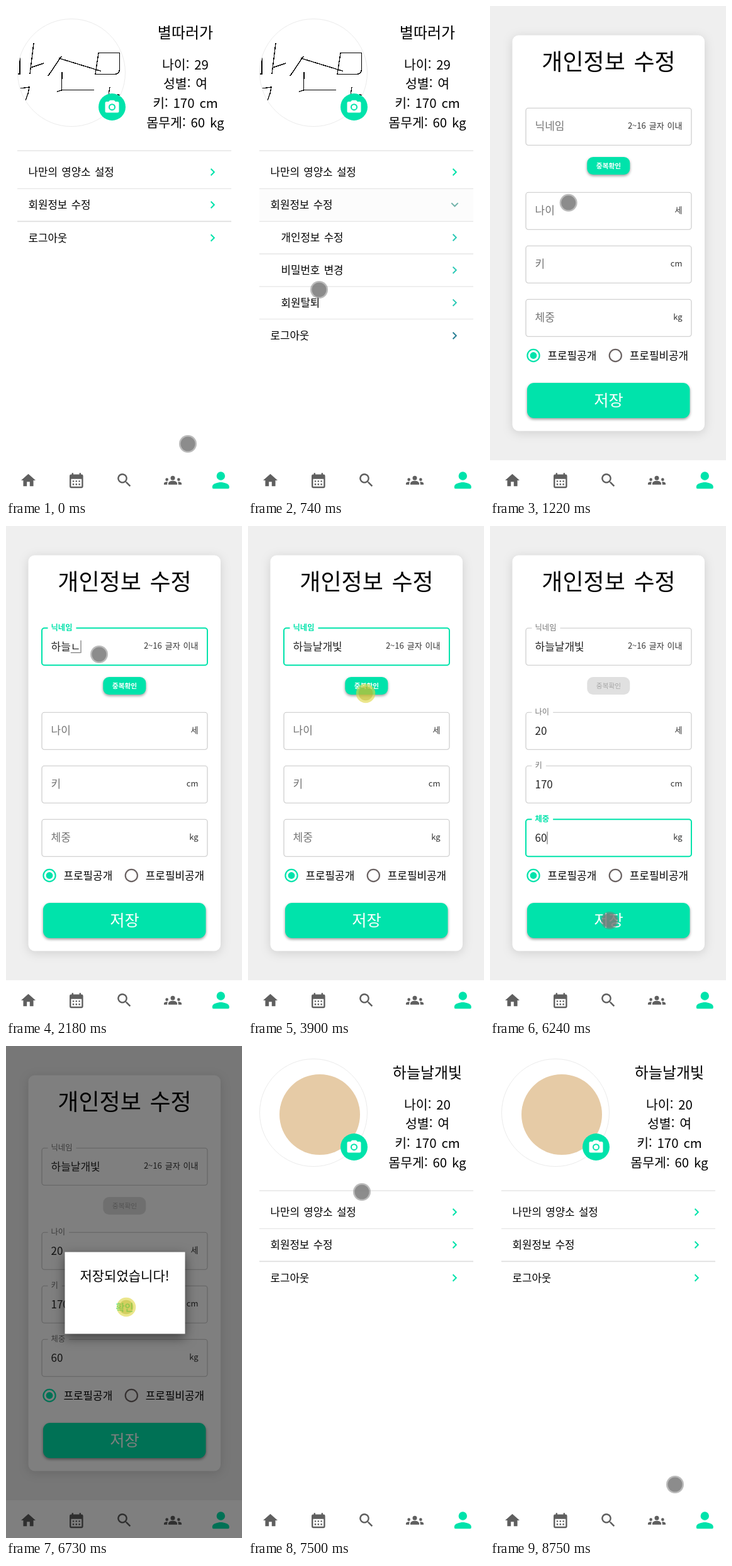
These frames come from a looping animation (375 by 782 pixels, 8820 ms). An HTML page:

```html
<!DOCTYPE html>
<html lang="ko">
<head>
<meta charset="utf-8">
<title>개인정보 수정</title>
<style>
  html, body { margin: 0; width: 100%; height: 100%; overflow: hidden; background: #fff; }
  svg { display: block; width: 375px; height: 782px; }
  text { font-family: "Noto Sans CJK KR", "Noto Sans CJK", "Noto Sans", sans-serif; word-spacing: .1em; white-space: pre; }
  .card { filter: drop-shadow(0 3px 8px rgba(0,0,0,.13)); }
  .raised { filter: drop-shadow(0 2px 2px rgba(0,0,0,.4)); }
  .dialog { filter: drop-shadow(0 6px 9px rgba(0,0,0,.5)); }
</style>
</head>
<body>
<svg id="stage" viewBox="0 0 375 782"></svg>
<script>
const LOOP = 8820, GREEN = '#00e3ab', GRAY = '#5f5f5f';
const $ = id => document.getElementById(id);

// y is the middle of the line of text
const text = (s, x, y, size, o = {}) =>
  `<text x="${x}" y="${y + size * .37}" font-size="${size}" fill="${o.fill || '#000'}"
    text-anchor="${o.anchor || 'start'}" font-weight="${o.weight || 400}">${s}</text>`;
const mid = (s, x, y, size, o = {}) => text(s, x, y, size, { ...o, anchor: 'middle' });
const rect = (x, y, w, h, fill, more = '') =>
  `<rect x="${x}" y="${y}" width="${w}" height="${h}" fill="${fill}" ${more}/>`;
const circle = (x, y, r, fill, more = '') => `<circle cx="${x}" cy="${y}" r="${r}" fill="${fill}" ${more}/>`;
const line = (y, color = '#e6e6e6', w = 1.3) => `<path d="M18 ${y}H358" stroke="${color}" stroke-width="${w}"/>`;
const icon = (d, x, y, s, fill = GRAY) =>
  `<path transform="translate(${x} ${y}) scale(${s}) translate(-12 -12)" d="${d}" fill="${fill}" fill-rule="evenodd"/>`;
const chevron = (y, color = GREEN, turn = 0) =>
  `<path transform="translate(328.5 ${y}) rotate(${turn})" d="M-2.9 -5.2L2.3 0L-2.9 5.2" fill="none" stroke="${color}" stroke-width="2"/>`;

const ICONS = {
  home: 'M10 20v-6h4v6h5v-8h3L12 3 2 12h3v8z',
  calendar: 'M19 4h-1V2h-2v2H8V2H6v2H5a2 2 0 0 0-2 2v14a2 2 0 0 0 2 2h14a2 2 0 0 0 2-2V6a2 2 0 0 0-2-2z' +
    'M5 10h14v10H5z' + [12, 16].map(y => [7, 11, 15].map(x => `M${x} ${y}h2v2h-2z`).join('')).join(''),
  search: 'M15.5 14h-.8l-.3-.3A6.5 6.5 0 1 0 13.7 14.4l.3.3v.8l5 5L20.5 19zM9.5 14a4.5 4.5 0 1 1 0-9 4.5 4.5 0 0 1 0 9z',
  groups: 'M12 6a3 3 0 0 1 0 6 3 3 0 0 1 0-6zM6 18v-1.6c0-4.9 12-4.9 12 0V18z' +
    'M4 9a2 2 0 0 1 0 4 2 2 0 0 1 0-4zM0 18v-1.6c0-1.8 2.8-2.7 5.1-2.3q-.6 1-.6 2.3V18z' +
    'M20 9a2 2 0 0 1 0 4 2 2 0 0 1 0-4zM24 18v-1.6c0-1.8-2.8-2.7-5.1-2.3q.6 1 .6 2.3V18z',
  person: 'M12 4a4 4 0 0 1 0 8 4 4 0 0 1 0-8zM12 14c-2.7 0-8 1.3-8 4v1q0 1 1 1h14q1 0 1-1v-1c0-2.7-5.3-4-8-4z',
  camera: 'M9 2L7.2 4H4a2 2 0 0 0-2 2v12a2 2 0 0 0 2 2h16a2 2 0 0 0 2-2V6a2 2 0 0 0-2-2h-3.2L15 2z' +
    'M12 17a5 5 0 1 1 0-10 5 5 0 0 1 0 10zM12 8.8a3.2 3.2 0 1 0 0 6.4 3.2 3.2 0 0 0 0-6.4z'
};
const DOODLE = 'M22 82V108H18M44 59L38 108M39 98L60 91M88 80L67 111M84 83L151 103.5' +
  'M147 74.5H180.5V101Q180 108 173 108.5H142L147 74.5M89 105L88.5 135M81 136L90 133.5H140' +
  'M22 131L37 129L35 139L31 150M165 129L163 141M177 141L184 142';

const profile = `
  <g id="profile">
    ${rect(0, 0, 375, 722, '#fff')}
    <clipPath id="round"><circle cx="104" cy="106" r="85"/></clipPath>
    <g clip-path="url(#round)">
      <path id="doodle" d="${DOODLE}" fill="none" stroke="#000" stroke-width="1.4" shape-rendering="crispEdges"/>
      ${circle(114, 109, 64, '#e6cba6', 'id="portrait"')}
    </g>
    ${circle(104, 106, 85.5, 'none', 'stroke="#ebebeb"')}
    ${circle(168.5, 160.5, 21.5, GREEN)}
    ${icon(ICONS.camera, 168.5, 160.7, 1.1, '#fff')}
    <g id="facts"></g>
    ${line(230)}
    ${text('나만의 영양소 설정', 35.5, 264, 16.8)}${chevron(264)}
    <g id="menu"></g>
  </g>`;

const radio = (x, label, on) =>
  circle(x, 555.5, 9.6, 'none', `stroke="${on ? GREEN : '#6a6262'}" stroke-width="2.2"`) +
  (on ? circle(x, 555.5, 5.4, GREEN) : '') + text(label, x + 22.5, 555.5, 16.9);

const form = `
  <g id="form">
    ${rect(0, 0, 375, 722, '#efefef')}
    ${rect(35.5, 46.5, 305.5, 629, '#fff', 'rx="10" class="card"')}
    ${mid('개인정보 수정', 188.5, 88.5, 36)}
    <g id="fields"></g>
    ${radio(69, '프로필공개', true)}${radio(199.3, '프로필비공개', false)}
    ${rect(59, 599, 258.5, 56, GREEN, 'rx="11" class="raised"')}
    ${mid('저장', 188.5, 626.5, 25.3, { fill: '#fff' })}
  </g>`;

const nav = `
  ${rect(0, 722, 375, 60, '#fff')}
  ${icon(ICONS.home, 35.5, 754, 1.15)}${icon(ICONS.calendar, 111.8, 754.2, 1.2)}
  ${icon(ICONS.search, 188, 753.8, 1.2)}${icon(ICONS.groups, 265, 753.8, 1.17)}
  ${icon(ICONS.person, 341.3, 753.7, 1.68, GREEN)}`;

const dialog = `
  <g id="dialog">
    ${rect(0, 0, 375, 782, '#000', 'opacity=".5"')}
    ${rect(93.5, 327.5, 191, 130, '#fff', 'class="dialog"')}
    ${mid('저장되었습니다!', 188.5, 365, 21)}
    ${mid('확인', 188.5, 415, 15, { fill: GREEN, weight: 700 })}
  </g>`;

$('stage').innerHTML = profile + form + nav + dialog + '<g id="pointer"></g>';

const NICK = '하늘날개빛';
const typing = [
  { top: 162, label: '닉네임', unit: '2~16 글자 이내', focus: [1560, 4100], compose: 3830,
    keys: [[1780, 'ㅎ'], [1850, '하'], [1920, '하느'], [1980, '하늘'], [2180, '하늘ㄴ'], [2280, '하늘나'], [2370, '하늘날'],
      [2470, '하늘날ㄱ'], [2570, '하늘날개'], [2840, '하늘날개비'], [2970, NICK]] },
  { top: 296, label: '나이', unit: '세', focus: [4100, 4870], keys: [[4720, '2'], [4790, '20']] },
  { top: 381, label: '키', unit: 'cm', focus: [4870, 5270], keys: [[4970, '17'], [5070, '170']] },
  { top: 466, label: '체중', unit: 'kg', focus: [5270, 6300], keys: [[5470, '6'], [5630, '60']] }
];

const pen = document.createElement('canvas').getContext('2d');
function width(s, size) {
  pen.font = `${size}px "Noto Sans CJK KR", "Noto Sans CJK", "Noto Sans", sans-serif`;
  return pen.measureText(s).width;
}

function field(f, t) {
  const value = f.keys.reduce((v, [at, s]) => t >= at ? s : v, '');
  const on = t >= f.focus[0] && t < f.focus[1];
  const y = f.top + 29.3, color = on ? GREEN : '#757575';
  let out = rect(57, f.top + .3, 263, 59, 'none', `rx="4" stroke="${on ? GREEN : '#c6c6c6'}" stroke-width="${on ? 2 : 1.1}"`);
  if (on || value) {
    out += rect(66.5, f.top - 2, width(f.label, 12.3) + 11, 5, '#fff') +
      text(f.label, 71.5, f.top - 1, 12.3, { fill: color, weight: on ? 700 : 400 });
  } else out += text(f.label, 71.5, y - .5, 17, { fill: color });
  out += text(value, 71.5, y, 17, { fill: '#222' }) + text(f.unit, 305.5, y - 1, 13, { fill: '#333', anchor: 'end' });
  const end = 71.5 + width(value, 17);
  if (on && !(t >= f.compose)) {
    out += rect(end, y - 9.5, 1.2, 20, '#777');
    if (f.compose && value) out += rect(end - 15.6, y + 9.5, 15.6, 1.2, '#777');
  }
  return out;
}

function checkButton(t) {
  const off = t >= 4040;
  return rect(154.3, 240, 68, 28, off ? '#e0e0e0' : GREEN, `rx="9.5" ${off ? '' : 'class="raised"'}`) +
    mid('중복확인', 188.5, 253.7, 10.7, off ? { fill: '#a6a6a6' } : { fill: '#fff', weight: 700 });
}

function facts(saved) {
  const rows = [`나이: ${saved ? 20 : 29}`, '성별: 여', '키: 170 cm', '몸무게: 60 kg'];
  return mid(saved ? NICK : '별따러가', 285, 42, 24) +
    rows.map((s, i) => mid(s, 285, 93 + i * 30.8, 20.5)).join('');
}

function menu(p) {
  const shift = 155.5 * p, open = p > 0;
  const subs = ['개인정보 수정', '비밀번호 변경', '회원탈퇴'].map((s, i) =>
    text(s, 52.5, 368 + i * 51.8, 16.8) + chevron(368 + i * 51.8, '#2dcab6') + line(394 + i * 51.8)).join('');
  return (open ? rect(18, 291, 340, 51, '#fcfcfc') : '') + line(290.3) +
    text('회원정보 수정', 35.5, 316, 16.8) +
    chevron(316, open ? '#72b3aa' : GREEN, open ? 90 : 0) +
    `<clipPath id="fold">${rect(0, 343, 375, shift, '#fff')}</clipPath><g clip-path="url(#fold)">${subs}</g>` +
    line(342.3, open ? '#e6e6e6' : '#dedede', open ? 1.3 : 1.7) +
    text('로그아웃', 35.5, 368.3 + shift, 16.8) + chevron(368.5 + shift, open ? '#2c8196' : GREEN);
}

// Pointer moves: first change, last change, number of steps, end point
const moves = [
  [70, 400, 6, 130, 318], [470, 740, 5, 113, 451], [810, 940, 3, 112, 372], [1140, 1430, 5, 148, 204],
  [3500, 3830, 6, 187, 266], [4040, 4170, 3, 185, 488], [6030, 6230, 4, 190, 627], [6430, 6630, 4, 191, 415],
  [6830, 6900, 2, 172, 184], [6970, 7030, 2, 153, 171], [7430, 7500, 2, 181, 232],
  [7600, 7600, 1, 375, 552], [7890, 8160, 5, 291, 487], [8480, 8750, 5, 294, 697]
];
const presses = [[400, 470], [1000, 1140], [1500, 1560], [3900, 4040], [6300, 6370], [6730, 6830], [7300, 7430]];
const within = (t, [a, b]) => t >= a && t < b;

function pointer(t) {
  if (within(t, [7560, 7890])) return '';
  let x = 289, y = 696;
  for (const [from, to, n, tx, ty] of moves) {
    if (t < from) break;
    const step = n > 1 ? Math.min(n, 1 + Math.floor((t - from) / (to - from) * (n - 1) + 1e-6)) : 1;
    const p = step / n, e = p * p * (3 - 2 * p);
    x += (tx - x) * e;
    y += (ty - y) * e;
  }
  return presses.some(p => within(t, p))
    ? circle(x, y, 15.3, 'rgba(222,214,70,.62)') + circle(x, y, 11.3, 'rgba(170,165,20,.36)')
    : circle(x, y, 14, 'rgba(120,120,120,.5)') + circle(x, y, 11.5, 'rgba(122,122,122,.72)');
}

const shown = {};
function put(id, html) {
  if (shown[id] !== html) $(id).innerHTML = shown[id] = html;
}
const show = (id, on) => $(id).setAttribute('display', on ? 'inline' : 'none');
const ramp = (t, a, b) => Math.max(0, Math.min(1, (t - a) / (b - a)));

function render(t) {
  const saved = t >= 6830, editing = t >= 1070 && !saved;
  show('profile', !editing);
  show('form', editing);
  show('doodle', t < 7430);
  show('portrait', t >= 7430);
  put('facts', facts(saved));
  const p = saved ? 0 : ramp(t, 470, 680);
  put('menu', menu(p * p * (3 - 2 * p)));
  put('fields', typing.map(f => field(f, t)).join('') + checkButton(t));
  show('dialog', t >= 6370 && !saved);
  $('dialog').setAttribute('opacity', ramp(t, 6300, 6520));
  put('pointer', pointer(t));
}

const start = performance.now();
function tick() {
  render((performance.now() - start) % LOOP);
  requestAnimationFrame(tick);
}
tick();
</script>
</body>
</html>
```
